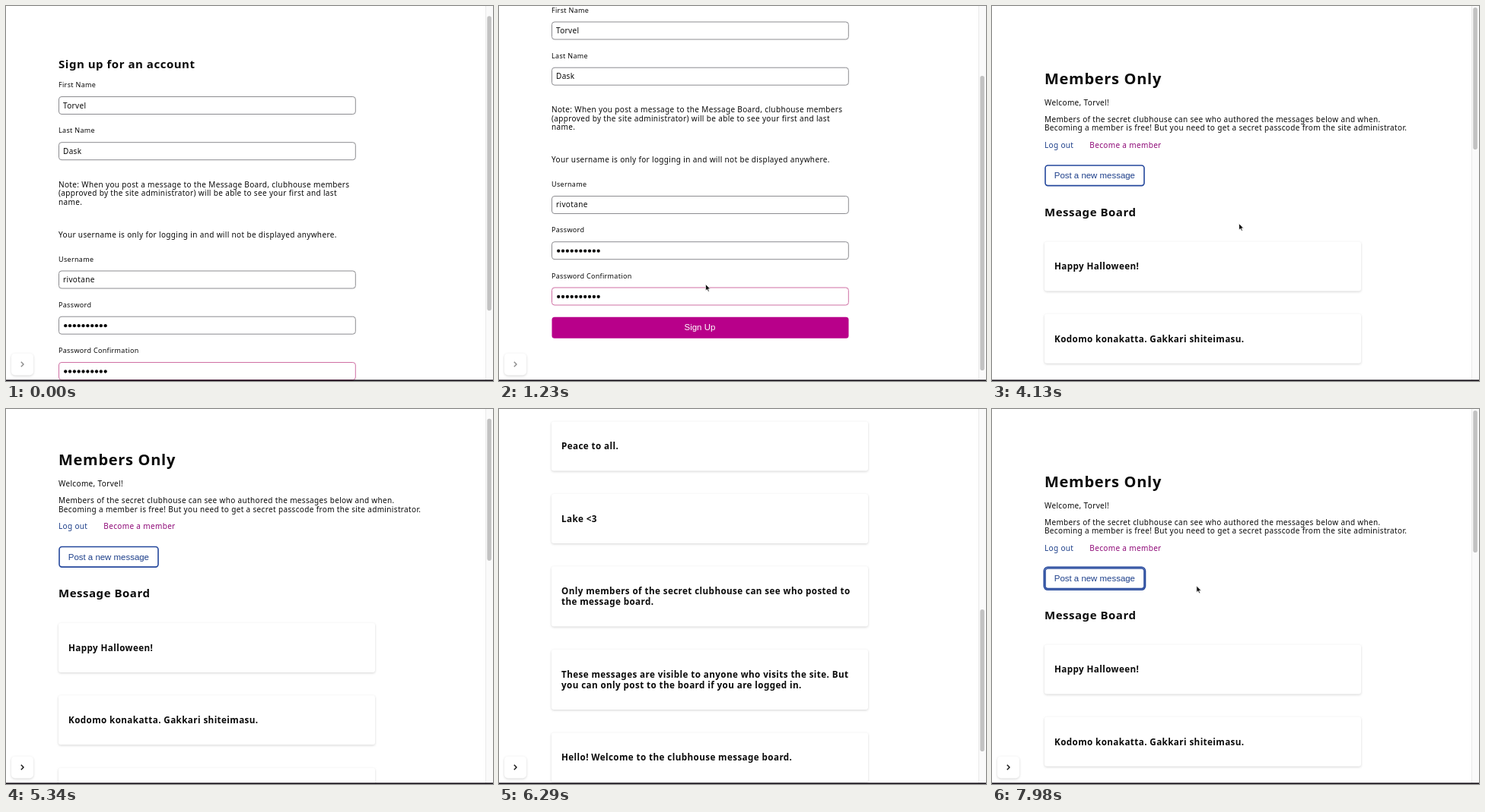
These frames come from a looping animation (640x494 px, 8 s). An HTML page:

```html
<!DOCTYPE html>
<html lang="en">
<head>
<meta charset="utf-8">
<title>Members Only</title>
<style>
  html, body { margin: 0; width: 100%; height: 100%; overflow: hidden; background: #fff; }
  svg { display: block; width: 100vw; height: 100vh; }
  text { font: 10px "Noto Sans", "Open Sans", sans-serif; letter-spacing: .035em; fill: #0a0a0a; white-space: pre; }
  .label { font-size: 9px; }
  .h1 { font-size: 20px; font-weight: 700; }
  .h2 { font-size: 15px; font-weight: 700; }
  .h3 { font-size: 11.65px; font-weight: 700; }
  .btn { font: 11.45px "Liberation Sans", Arial, sans-serif; letter-spacing: 0; }
  .white { fill: #fff; }
  .blue { fill: #1d3f8a; }
  .plum { fill: #8f0a78; }
  .field { fill: #fff; stroke: #8c8c90; }
  .ring { fill: none; stroke: #24479c; stroke-width: 1.6; }
  .gap { fill: none; stroke: #fff; }
  .card { fill: #fff; filter: drop-shadow(0 1px 1.6px rgba(0, 0, 0, .17)); }
</style>
</head>
<body>
<svg id="stage" viewBox="0 0 640 494" preserveAspectRatio="none">
  <rect width="640" height="494" fill="#fff"/>
  <g id="form"></g>
  <g id="board"></g>
  <rect x="630" width="10" height="494" fill="#fafafa"/>
  <path d="M630.5 0V494" stroke="#e9e9e9"/>
  <rect id="thumb" x="632.3" width="5.6" rx="2.8" fill="#c2c2c2"/>
  <g id="toggle">
    <rect class="card" x="7" y="457.5" width="29" height="29" rx="5"/>
    <path id="chevron" d="M19.8 468.8l3.2 3.2-3.2 3.2" fill="none" stroke-width="1.4"/>
  </g>
  <path id="cursor" d="M0 0V8.6L2 6.8 3.4 9.8 4.8 9.2 3.5 6.3H6.2Z" fill="#111" stroke="#fff" stroke-width=".7"/>
  <rect y="492.4" width="640" height="1.6" fill="#17121a"/>
</svg>
<script>
const LOOP = 8000;
const FORM_TOP = 14;  // scroll offset at which the form coordinates are laid out
const $ = id => document.getElementById(id);

function add(parent, tag, attrs, content = '') {
  const node = document.createElementNS('http://www.w3.org/2000/svg', tag);
  for (const key in attrs) node.setAttribute(key, attrs[key]);
  node.textContent = content;
  parent.append(node);
  return node;
}
const write = (parent, x, y, content, cls = '') => add(parent, 'text', { x, y, class: cls }, content);
const box = (parent, x, y, width, height, rx, cls) =>
  add(parent, 'rect', { x, y, width, height, rx, class: cls });

const form = $('form'), board = $('board');

function field(label, y, value) {
  write(form, 69, y - 12.3, label, 'label');
  const rect = box(form, 69.5, y, 389.8, 23, 3.5, 'field');
  if (value) write(form, 75, y + 15, value);
  else for (let i = 0; i < 10; i++)
    add(form, 'circle', { cx: 78.2 + i * 5.83, cy: y + 12, r: 2.15, fill: '#0a0a0a' });
  return rect;
}

write(form, 69, 81.6, 'Sign up for an account', 'h2');
field('First Name', 119.5, 'Torvel');
field('Last Name', 179.7, 'Dask');
['Note: When you post a message to the Message Board, clubhouse members',
 '(approved by the site administrator) will be able to see your first and last',
 'name.'].forEach((line, i) => write(form, 69, 238.5 + i * 11.7, line));
write(form, 69, 304.5, 'Your username is only for logging in and will not be displayed anywhere.');
field('Username', 349, 'rivotane');
field('Password', 409.2);
const confirmField = field('Password Confirmation', 469.5);
const signUp = box(form, 69.5, 508.2, 390, 28, 3.5, '');
const signUpRing = box(form, 68.2, 506.9, 392.6, 30.6, 4.5, 'ring');
const signUpGap = box(form, 69.5, 508.2, 390, 28, 3.5, 'gap');
write(form, 243.6, 525.8, 'Sign Up', 'btn white');

write(board, 69, 103, 'Members Only', 'h1');
write(board, 69, 130.7, 'Welcome, Torvel!');
write(board, 69, 152.7, 'Members of the secret clubhouse can see who authored the messages below and when.');
write(board, 69, 164.4, 'Becoming a member is free! But you need to get a secret passcode from the site administrator.');
write(board, 69, 186.5, 'Log out', 'blue');
write(board, 128.3, 186.5, 'Become a member', 'plum');
const postRing = box(board, 68.3, 208.3, 133.2, 30, 5, 'ring');
box(board, 70, 210, 130, 26.6, 3.5, 'ring');
write(board, 81.8, 227.2, 'Post a new message', 'btn blue');
write(board, 69, 276.6, 'Message Board', 'h2');

const messages = [
  'Happy Halloween!',
  'Kodomo konakatta. Gakkari shiteimasu.',
  'Good morning, everyone.',
  'It is getting colder outside. I hope that you all\nstay warm this week.',
  'Peace to all.',
  'Lake <3',
  'Only members of the secret clubhouse can see who posted to\nthe message board.',
  'These messages are visible to anyone who visits the site. But\nyou can only post to the board if you are logged in.',
  'Hello! Welcome to the clubhouse message board.'
];
let cardTop = 310.4;
for (const message of messages) {
  const lines = message.split('\n');
  const height = 50.8 + lines.length * 14.2;
  box(board, 69, cardTop, 416, height, 3, 'card');
  lines.forEach((line, i) => write(board, 82, cardTop + 36.7 + i * 14.2, line, 'h3'));
  cardTop += height + 30.4;
}

// Monotone cubic interpolation through [time, value] points.
function curve(points) {
  const slope = i => (points[i + 1][1] - points[i][1]) / (points[i + 1][0] - points[i][0]);
  const tangent = i => {
    if (i === 0 || i === points.length - 1) return 0;
    const a = slope(i - 1), b = slope(i);
    return a * b <= 0 ? 0 : 2 * a * b / (a + b);
  };
  return t => {
    if (t <= points[0][0]) return points[0][1];
    const i = points.findIndex(p => p[0] > t) - 1;
    if (i < 0) return points[points.length - 1][1];
    const [t0, v0] = points[i], [t1, v1] = points[i + 1];
    const h = t1 - t0, u = (t - t0) / h, w = 1 - u;
    return v0 * (1 + 2 * u) * w * w + tangent(i) * h * u * w * w
         + v1 * u * u * (3 - 2 * u) - tangent(i + 1) * h * u * u * w;
  };
}

const formScroll = curve([[10, 14], [200, 43], [400, 77], [600, 97], [810, 107], [1230, 112.5], [1420, 113.2]]);
const boardNudge = curve([[5340, 28.5], [5500, 54]]);
const boardSweep = curve([[5790, 54], [5950, 220], [6120, 500], [6290, 689], [6460, 780], [6560, 792],
                          [6700, 690], [6900, 370], [7100, 110], [7340, 0]]);
const boardScroll = t => t < 4660 ? 0 : t < 5340 ? 1.2 : t < 5790 ? boardNudge(t) : boardSweep(t);

const cursorX = curve([[1270, 271.5], [1480, 288.5], [2200, 288.5], [2490, 324.5]]);
const cursorY = curve([[1270, 366.5], [1480, 419.5], [2200, 419.5], [2490, 286.5]]);
function cursorAt(t) {
  if (t >= 1000 && t < 4450) return [cursorX(t), cursorY(t)];
  if (t >= 7560) return t < 7870 ? [88, 223.5] : t < 7980 ? [190, 230] : [268.8, 233];
  return null;
}

const hover = curve([[1460, 0], [1760, 1], [2260, 1], [2480, 0]]);
const mix = (a, b, u) => `rgb(${a.map((v, i) => Math.round(v + (b[i] - v) * u))})`;
const show = (node, on) => node.setAttribute('visibility', on ? 'inherit' : 'hidden');

function draw(t) {
  const onForm = t < 2600, clicked = t >= 1600;
  const scroll = onForm ? formScroll(t) : boardScroll(t);
  show(form, onForm);
  show(board, !onForm);
  form.setAttribute('transform', `translate(0 ${FORM_TOP - scroll})`);
  board.setAttribute('transform', `translate(0 ${-scroll})`);

  signUp.style.fill = mix([184, 0, 138], [206, 20, 144], hover(t));
  confirmField.style.stroke = clicked ? '#8c8c90' : '#cf6fa3';
  show(signUpRing, clicked);
  show(signUpGap, clicked);
  show(postRing, t >= 7640);

  const thumb = $('thumb');
  thumb.setAttribute('y', 2 + scroll * (onForm ? .8 : .38));
  thumb.setAttribute('height', onForm ? 388 : t < 4130 ? 181 : 187);

  show($('toggle'), t < 4130 || t >= 4240);
  $('chevron').setAttribute('stroke', onForm ? '#8b8b8b' : '#111');

  const position = cursorAt(t);
  show($('cursor'), position);
  if (position) $('cursor').setAttribute('transform', `translate(${position})`);
}

const start = performance.now();
function tick() {
  draw((performance.now() - start) % LOOP);
  requestAnimationFrame(tick);
}
tick();
</script>
</body>
</html>
```
